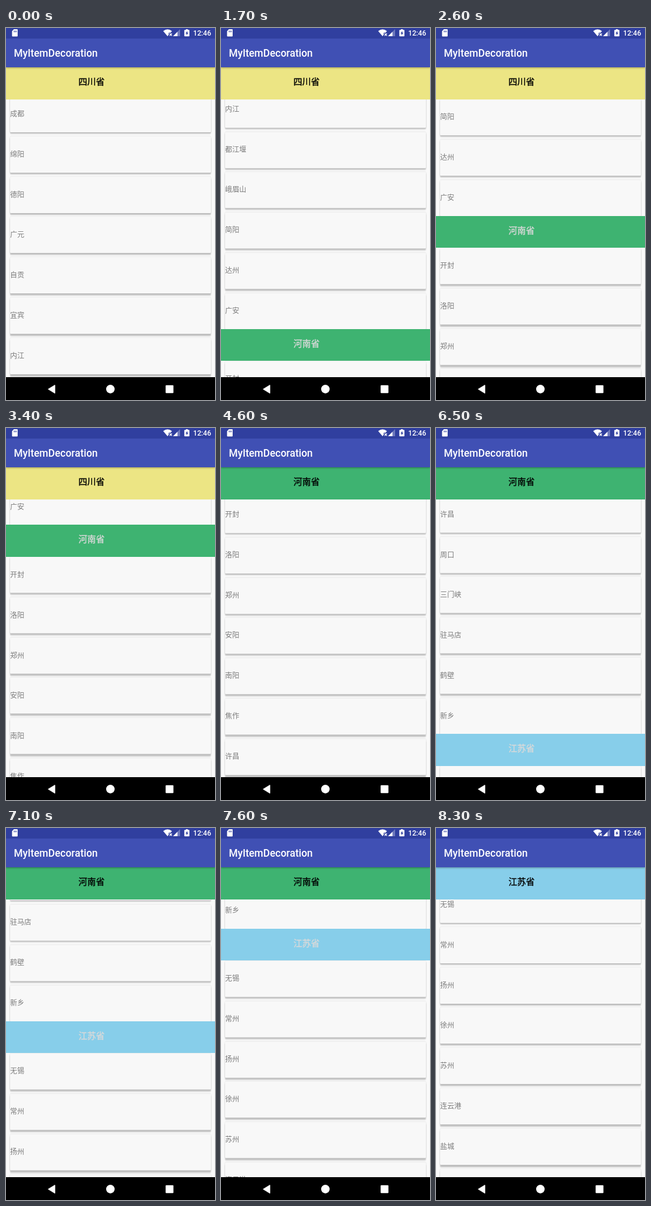
Recreate the animation shown at these times as an HTML page. Size 359x635 px, loop 9 s.

```html
<!DOCTYPE html>
<html lang="zh-CN">
<head>
<meta charset="utf-8">
<title>MyItemDecoration</title>
<style>
html, body { margin: 0; width: 100%; height: 100%; overflow: hidden; background: #f9f9f9; }
#stage { position: relative; width: 359px; height: 635px; overflow: hidden; background: #f9f9f9; }
#status, #bar, #nav, #view { position: absolute; left: 0; width: 359px; }
#status { top: 0; height: 18px; background: #303f9f; }
#bar {
  top: 18px; height: 49px; background: #4050b4; box-shadow: 0 1px 3px rgba(0,0,0,.35);
  color: #fff; font: 500 17.46px/50px Roboto, sans-serif; text-indent: 13.5px;
}
#clock { position: absolute; left: 321.5px; top: 0; color: #fff; font: 500 12.2px/18px Roboto, sans-serif; }
#nav { top: 596px; height: 39px; background: #000; }
#view { top: 67px; height: 529px; overflow: hidden; font-family: "Noto Sans CJK SC", "Noto Sans CJK", sans-serif; }
#list { position: absolute; inset: 0; }
.card {
  position: absolute; left: 7px; width: 345px; height: 62px; border-radius: 1.5px;
  background: #f8f8f8; color: #7c7c7c; font-size: 12.2px; line-height: 61px;
  box-shadow: 0 var(--drop) 2px rgba(0,0,0,.22), 0 0 2px rgba(0,0,0,.16);
}
.head {
  position: absolute; left: 0; width: 359px; height: 54.6px; text-indent: 124.5px;
  font-size: 15px; line-height: 48px; color: #d9d9d9; -webkit-text-stroke: .35px;
}
#pin { top: 0; height: 55px; color: #000; }
svg { position: absolute; left: 0; top: 0; fill: #fff; }
</style>
</head>
<body>
<div id="stage">
  <div id="view">
    <div id="list"></div>
    <div id="pin" class="head"></div>
    <div id="next" class="head"></div>
  </div>
  <div id="bar">MyItemDecoration</div>
  <div id="status">
    <svg width="359" height="18">
      <path fill-rule="evenodd" d="M13.6 2H19a1 1 0 0 1 1 1v10.5a1 1 0 0 1-1 1h-7.6a1 1 0 0 1-1-1V5.4zM13.4 4.6v2.6h1V4.6zm2 0v2.6h1V4.6zm2 0v2.6h1V4.6z"/>
      <path d="M270 5.2q7.5-6 15 0l-2.2 2.8h-3.3v3.4l-2 2.5z"/>
      <path d="M281 9.3l4 4m0-4l-4 4" stroke="#fff" stroke-width="1.3"/>
      <path d="M299 2v12h-12z" opacity=".3"/>
      <path d="M294.5 6.5V14H287z"/>
      <path fill-rule="evenodd" d="M309 2h3.4v1.2h1.8a.9.9 0 0 1 .9.9v9.2a.9.9 0 0 1-.9.9h-7a.9.9 0 0 1-.9-.9V4.1a.9.9 0 0 1 .9-.9H309zM311.4 5l-3 4.4h1.8v3l2.9-4.4h-1.7z"/>
    </svg>
    <div id="clock">12:46</div>
  </div>
  <div id="nav">
    <svg width="359" height="39">
      <path d="M72.5 20.5l11.5-7v14z" stroke="#fff" stroke-width="1" stroke-linejoin="round"/>
      <circle cx="179.3" cy="20.4" r="7.3"/>
      <rect x="274.2" y="13.8" width="13.4" height="13.4" rx="1.2"/>
    </svg>
  </div>
</div>
<script>
const LOOP = 9000, STEP = 100;
const PITCH = 68.8, CARD = 62, HEAD = 54.6, EXTRA = 47.4, FIRST = 49, PER = 12;

const groups = [
  { name: '四川省', color: '#ece584', items: '成都 绵阳 德阳 广元 自贡 宜宾 内江 都江堰 峨眉山 简阳 达州 广安' },
  { name: '河南省', color: '#3eb371', items: '开封 洛阳 郑州 安阳 南阳 焦作 许昌 周口 三门峡 驻马店 鹤壁 新乡' },
  { name: '江苏省', color: '#87ceea', items: '无锡 常州 扬州 徐州 苏州 连云港 盐城 南通' }
];

// Scroll offset over time: [ms, px]
const keys = [
  [0, 0], [600, 0], [1100, 205], [1300, 205], [1700, 420.6], [2000, 420.6],
  [2700, 625], [2900, 625], [3400, 769.4], [3900, 823.4], [4600, 871.6],
  [5200, 905], [5300, 905], [5800, 1086], [6200, 1262], [6300, 1262],
  [7100, 1477.6], [7300, 1535], [7800, 1690], [8300, 1762], [LOOP, 1762]
];

const $ = id => document.getElementById(id);
const list = $('list'), pin = $('pin'), next = $('next');

const cards = groups.flatMap((g, n) => g.items.split(' ').map((text, k) => {
  const el = document.createElement('div');
  const top = FIRST + PITCH * (n * PER + k) + EXTRA * n;
  el.className = 'card';
  el.textContent = text;
  el.style.top = top + 'px';
  list.append(el);
  return { el, top };
}));

groups.forEach((g, n) => g.top = n ? cards[n * PER].top - HEAD : -Infinity);

const slope = i => (keys[i + 1][1] - keys[i][1]) / (keys[i + 1][0] - keys[i][0]);

// Monotone tangent: harmonic mean of the neighbouring slopes
function tangent(i) {
  if (i === 0 || i === keys.length - 1) return 0;
  const a = slope(i - 1), b = slope(i);
  return a * b > 0 ? 2 * a * b / (a + b) : 0;
}

function scrollAt(t) {
  let i = 0;
  while (i < keys.length - 2 && t >= keys[i + 1][0]) i++;
  const [t0, a] = keys[i], [t1, b] = keys[i + 1];
  const d = t1 - t0, u = (t - t0) / d, v = 1 - u;
  return a * v * v * (1 + 2 * u) + b * u * u * (3 - 2 * u)
    + d * u * v * (tangent(i) * v - tangent(i + 1) * u);
}

function fill(el, g) {
  el.textContent = g.name;
  el.style.background = g.color;
}

function draw() {
  const t = Math.floor(performance.now() % LOOP / STEP) * STEP;
  const y = scrollAt(t);
  list.style.transform = `translateY(${-y}px)`;
  for (const { el, top } of cards) {
    // Shadows grow longer towards the bottom of the screen
    const drop = 2 + 2 * Math.min(1, Math.max(0, (top + CARD - y) / 529));
    el.style.setProperty('--drop', drop.toFixed(2) + 'px');
  }
  const now = groups.findLastIndex(g => g.top <= y);
  fill(pin, groups[now]);
  const after = groups[now + 1];
  next.hidden = !after;
  if (after) {
    fill(next, after);
    next.style.top = after.top - y + 'px';
  }
  requestAnimationFrame(draw);
}
draw();
</script>
</body>
</html>
```
